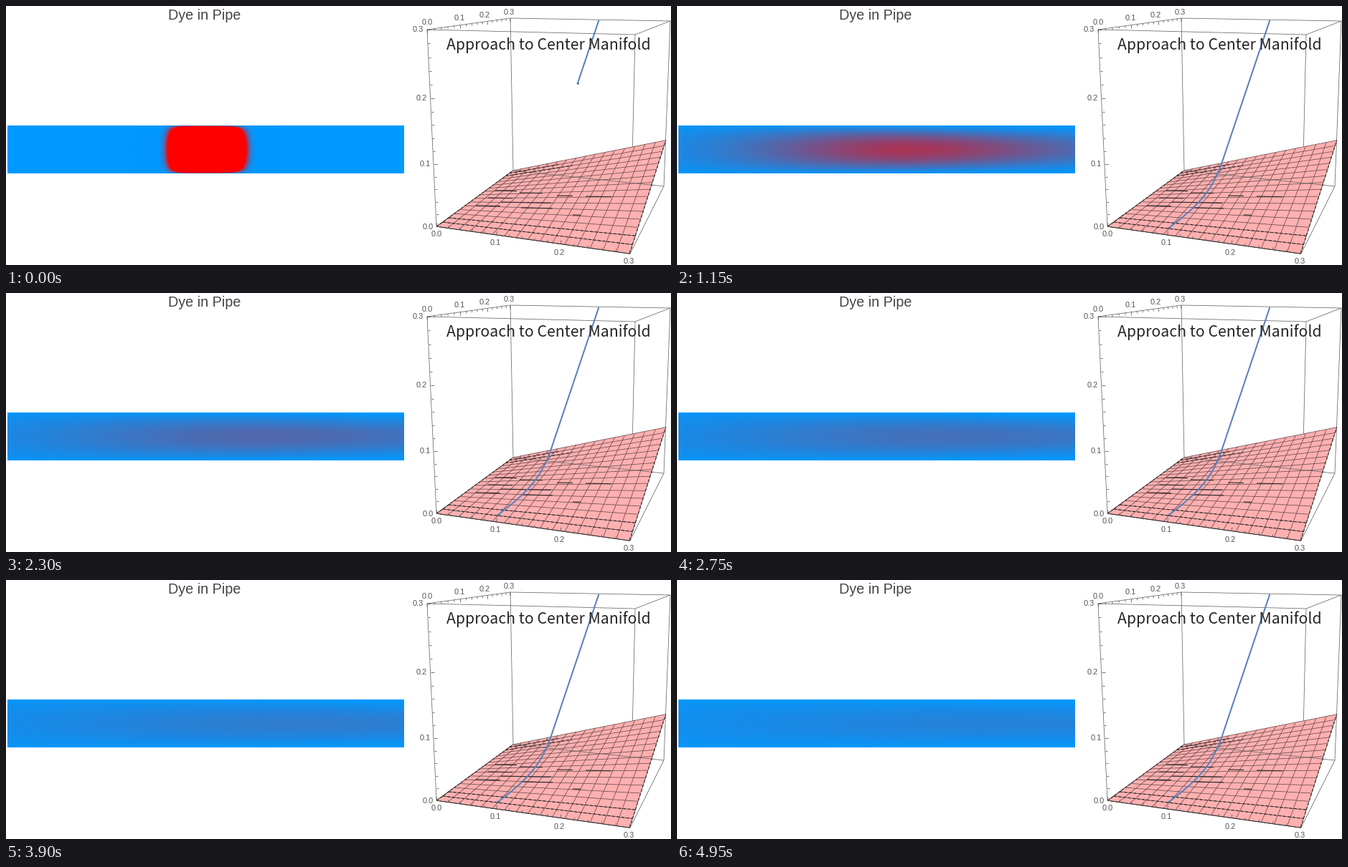
Recreate the animation shown at these times as a matplotlib script. Size 927 by 362 pixels, loop 5000 ms.

```python
import numpy as np
import matplotlib.pyplot as plt
from matplotlib.animation import FuncAnimation

W, H, DPI = 927, 362, 64
FRAMES, INTERVAL = 100, 50
SANS = "Liberation Sans"
BLUE = np.array([0, 153, 255]) / 255
RED = np.array([1.0, 0, 0])
GREY, DARK = "#6a6a6a", "#262626"


def pt(px):
    return px * 72 / DPI


fig = plt.figure(figsize=(W / DPI, H / DPI), dpi=DPI, facecolor="white")
ax = fig.add_axes([0, 0, 1, 1])
ax.set_axis_off()


def line(a, b, color=GREY, width=0.8, z=2, **kw):
    return ax.plot([a[0], b[0]], [a[1], b[1]], color=color, lw=pt(width),
                   zorder=z, solid_capstyle="butt", **kw)


def label(x, y, text, px=11, color="#555555", font=SANS, va="center_baseline"):
    ax.text(x, y, text, fontsize=pt(px), color=color, family=font,
            ha="center", va=va, zorder=8)


# Pipe: dye spreads, drifts right and fades
X0, X1, Y0, Y1 = 2, 555, 167, 234
px_x = np.arange(X0, X1)[None, :] + 0.5
px_y = np.linspace(-1, 1, 2 * (Y1 - Y0) + 1)[1::2][:, None]
across = np.cos(np.pi / 2 * px_y)


def dye(t):
    tau = t + 0.05
    peak = 0.8 * tau ** -1.06
    spread = np.exp(np.interp(np.log(tau), np.log([0.05, 0.65, 1.85, 2.8, 5]),
                              np.log([42, 158, 300, 372, 510])))
    power = 1.8 + 2.2 * np.exp(-8 * t)
    d = px_x - (280 + 33 * t)
    right = 1 + 0.35 * (1 - np.exp(-t / 1.5))
    width = np.where(d > 0, spread * right, spread)
    along = np.exp(-np.abs(d / width) ** power)
    flat = np.clip(1 + 0.35 * d / 280, 0.5, 1.2)
    c = np.clip(peak * along * across ** flat, 0, 1)[..., None]
    return BLUE + (RED - BLUE) * c


pipe = ax.imshow(dye(0), extent=(X0, X1, Y1, Y0), interpolation="nearest",
                 aspect="auto", zorder=1)

# Box: perspective camera solved from the eight projected corners
CORNERS = {
    (0, 0, 0): (600, 308), (1, 0, 0): (870, 346),
    (0, 1, 0): (707, 230), (1, 1, 0): (917, 252),
    (0, 0, 1): (587, 33), (1, 0, 1): (877, 40),
    (0, 1, 1): (703, 17), (1, 1, 1): (926, 21),
}


def solve_camera():
    rows, rhs = [], []
    for (x, y, z), (u, v) in CORNERS.items():
        rows.append([x, y, z, 1, 0, 0, 0, 0, -u * x, -u * y, -u * z])
        rows.append([0, 0, 0, 0, x, y, z, 1, -v * x, -v * y, -v * z])
        rhs += [u, v]
    m = np.linalg.lstsq(np.array(rows, float), np.array(rhs, float), rcond=None)[0]
    return np.append(m, 1).reshape(3, 4)


CAMERA = solve_camera()


def project(x, y, z):
    u, v, w = CAMERA @ np.array([x, y, z, 1.0])
    return np.array([u / w, v / w])


def surface(x, y):
    return project(x, y, 0.29 * x * y)


for a in CORNERS:
    for axis in range(3):
        if a[axis] == 0:
            b = tuple(1 if i == axis else k for i, k in enumerate(a))
            back_floor = a == (0, 1, 0) and axis == 0
            line(CORNERS[a], CORNERS[b], z=5 if back_floor else 2)

# Surface sheet and its mesh
sheet = [surface(*c) for c in ((0, 0), (1, 0), (1, 1), (0, 1))]
ax.fill(*np.transpose(sheet), color="#ffb0b0", lw=0, zorder=3)
N = 16
for i in range(N + 1):
    s = i / N
    line(surface(s, 0), surface(s, 1), "#64484a", 0.75, 4)
    line(surface(0, s), surface(1, s), "#64484a", 0.75, 4)

dashes = dict(dashes=(3.5, 2.5))
line(surface(1, 0), surface(1, 1), DARK, 1.1, 5, **dashes)
line(surface(0, 0), surface(0, 1), DARK, 1, 5, **dashes)
for k, end in ((1, 1), (2, 1), (14, 0.45), (15, 0.35)):
    line(surface(0, k / N), surface(end, k / N), DARK, 1.1, 5, **dashes)
line(surface(0, 0), surface(1, 0), DARK, 0.9, 5)

STROKES = [(682, 258, 30), (716, 261, 32), (672, 268, 34), (655, 279, 34),
           (690, 274, 70), (718, 282, 44), (768, 265, 22), (808, 266, 36),
           (790, 292, 11)]
for x, y, n in STROKES:
    line((x, y), (x + n, y + n * 0.02), DARK, 1.1, 5)

# Ticks in steps of 0.02, long at each 0.1
for i in range(16):
    s = i / 15
    size = 5 if i % 5 == 0 else 3
    for base, step in ((project(0, 0, s), (size, 0)),
                       (project(0, s, 1), (0.4, size)),
                       (project(s, 0, 0), (0.6, -size))):
        line(base, base + step, "#555555", 0.8, 5)

LABELS = [
    [(588, 307), (584, 219), (579, 128), (574, 32)],
    [(600, 318), (682, 330), (771, 343), (868, 356)],
    [(587, 21), (632, 15), (667, 11), (701, 7)],
]
for places in LABELS:
    for k, (x, y) in enumerate(places):
        label(x, y + 0.5, f"0.{k}")

label(277, 19, "Dye in Pipe", 19.7, "#444444", va="baseline")
label(756, 61, "Approach to Center Manifold", 21.2, "#262626",
      "Noto Sans CJK JP", va="baseline")

# Trajectory: straight fall, then a bend along the sheet
s = np.linspace(0, 1, 200)[:, None]
fall = np.array([826, 21]) + s * np.array([-66, 197])
bend = ((1 - s) ** 3 * [760, 218] + 3 * s * (1 - s) ** 2 * [746, 258]
        + 3 * s ** 2 * (1 - s) * [728, 278] + s ** 3 * [686, 310])
track = np.vstack([fall, bend[1:]])

path, = ax.plot([], [], color="#5680bd", lw=pt(2), zorder=6)
tip, = ax.plot([], [], "o", color="#3d5f95", ms=pt(2.6), mew=0, zorder=7)

ax.set_xlim(0, W)
ax.set_ylim(H, 0)


def update(frame):
    t = frame * INTERVAL / 1000
    pipe.set_data(dye(t))
    y = 310 - 289 * np.exp(-6.2 * (t + 0.058))
    x = np.interp(y, track[:, 1], track[:, 0])
    done = track[track[:, 1] < y]
    path.set_data(np.append(done[:, 0], x), np.append(done[:, 1], y))
    tip.set_data([x], [y])
    return pipe, path, tip


anim = FuncAnimation(fig, update, frames=FRAMES, interval=INTERVAL,
                     repeat=True, repeat_delay=0, blit=False)
plt.show()
```
